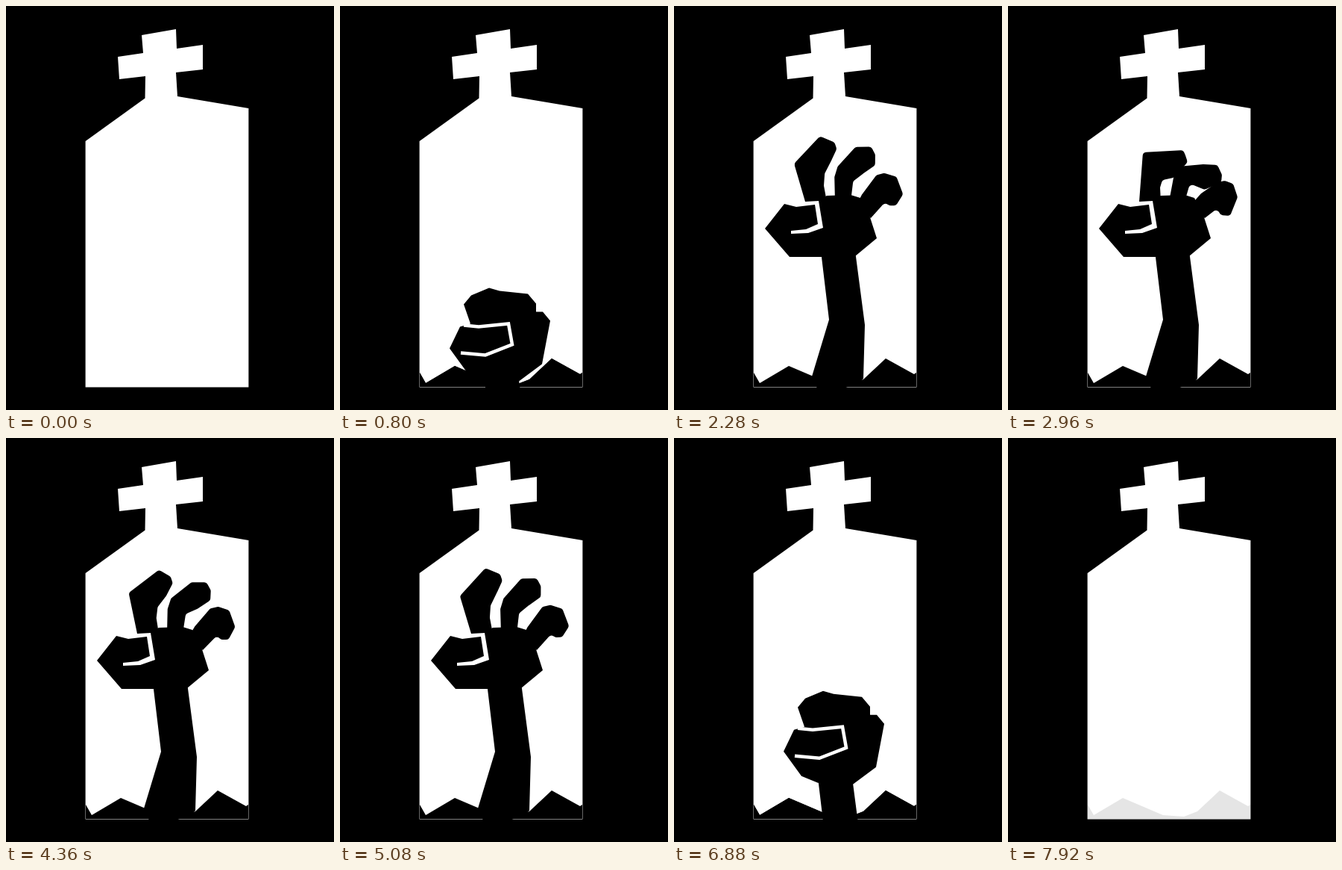
An HTML page with a canvas that plays this animation: 440x541 px, repeating every 8000 ms.

```html
<!DOCTYPE html>
<html lang="en">
<head>
<meta charset="utf-8">
<title>Hand at the gravestone</title>
<style>
html, body { margin: 0; width: 100%; height: 100%; overflow: hidden; background: #000; }
canvas { display: block; width: 440px; height: 541px; }
</style>
</head>
<body>
<canvas id="stage" width="440" height="541"></canvas>
<script>
const ctx = document.getElementById('stage').getContext('2d');
const LOOP = 8000, STEP = 40, DEPTH = 317;

const stone = [106.6, 181, 186.5, 123.5, 187, 94, 152, 98, 150, 68, 184, 63, 182, 39, 228, 31, 229, 57,
  264, 52, 264, 85, 228, 89, 230, 121, 325.4, 137, 325.4, 510.4, 106.6, 510.4];
const ground = [107, 491, 115, 505, 154, 482, 208, 505, 236, 507, 254, 500, 284, 472, 322, 493,
  325, 491, 325, 510, 107, 510];
const palm = [194, 261, 205, 254, 237, 253, 250, 257, 263, 283, 272, 311, 243, 335, 197, 336, 155, 336,
  122, 298, 148, 265, 164, 269, 189, 266, 193, 292, 177, 299, 157, 301, 157, 305, 180, 304, 200, 297];
const arm = [197, 328, 243, 328, 256, 427, 254, 499, 250, 503, 228, 512, 192, 512, 185, 496, 208, 420];
const fist = [175, 260, 166, 234, 176, 222, 200, 212, 214, 216, 252, 220, 263, 233, 263, 244, 272, 244,
  282, 256, 271, 314, 240, 337, 193, 335, 171, 326, 147, 293, 161, 264];
const fistCrease = [166, 262, 186, 264, 226, 260, 231, 288, 195, 302, 162, 299];

// A finger swings around its knuckle from the open to the bent outline.
const fingers = [
  { knuckle: [188, 258], left: [176, 262], right: [205, 262, 194, 261],
    open: [157, 217, 182, 173, 207, 179, 210, 188, 205, 200, 200, 222, 200, 240],
    bent: [181, 196, 235, 193, 238, 200, 241, 209, 222, 230, 207, 233, 204, 243] },
  { knuckle: [227, 258], left: [216, 262], right: [237, 262],
    open: [213, 229, 217, 215, 235, 183, 257, 182, 262, 192, 263, 208, 248, 219, 239, 234],
    bent: [222, 230, 228, 215, 262, 212, 281, 213, 287, 226, 286, 236, 264, 246, 244, 238] },
  { knuckle: [256, 270], left: [244, 268], right: [264, 284],
    open: [250, 254, 268, 224, 279, 221, 297, 226, 307, 251, 297, 263, 288, 263, 284, 259],
    bent: [259, 251, 281, 236, 291, 234, 302, 238, 308, 256, 298, 281, 285, 280, 281, 271] }
];

// Time and curl: 0 is an open hand, 1 a bent one.
const curls = [[960, 1], [1240, 0], [1600, 0.9], [1680, 1], [2120, 0], [2800, 1], [2960, 1],
  [4360, 0.4], [5960, 0], [6400, 0.15], [6800, 0]];

const lerp = (a, b, k) => a + (b - a) * k;
const clamp = k => Math.max(0, Math.min(1, k));

function curlAt(t) {
  const i = curls.findIndex(key => key[0] > t);
  if (i < 1) return 0;
  const [t0, a] = curls[i - 1], [t1, b] = curls[i];
  return lerp(a, b, (t - t0) / (t1 - t0));
}

function sinkAt(t) {
  return DEPTH * clamp(t < 3000 ? (920 - t) / 230 : (t - 6720) / 400);
}

function groundAlpha(t) {
  const tenths = t < 4000 ? Math.floor((t - 40) / 80) : 10 - Math.floor((t - 7200) / 80);
  return clamp(tenths / 10);
}

function trace(p) {
  ctx.beginPath();
  for (let i = 0; i < p.length; i += 2) ctx.lineTo(p[i], p[i + 1]);
}

function poly(p, color) {
  trace(p);
  ctx.fillStyle = color;
  ctx.fill();
}

function swing({ knuckle: [cx, cy], open, bent }, k) {
  const out = [];
  for (let i = 0; i < open.length; i += 2) {
    const ax = open[i] - cx, ay = open[i + 1] - cy;
    const bx = bent[i] - cx, by = bent[i + 1] - cy;
    const angle = lerp(Math.atan2(ay, ax), Math.atan2(by, bx), k);
    const r = lerp(Math.hypot(ax, ay), Math.hypot(bx, by), k);
    out.push(cx + r * Math.cos(angle), cy + r * Math.sin(angle));
  }
  return out;
}

function drawFinger(finger, curl) {
  const p = [...swing(finger, curl), ...finger.right];
  ctx.beginPath();
  ctx.moveTo(...finger.left);
  for (let i = 0; i < p.length - 2; i += 2) ctx.arcTo(p[i], p[i + 1], p[i + 2], p[i + 3], 5);
  ctx.lineTo(...p.slice(-2));
  ctx.fillStyle = '#000';
  ctx.fill();
}

function drawFist() {
  poly(fist, '#000');
  trace(fistCrease);
  ctx.strokeStyle = '#fff';
  ctx.lineWidth = 4.5;
  ctx.stroke();
  ctx.translate(-4, 0);
  poly(arm, '#000');
}

function drawHand(t) {
  if (t < 960 || t >= 6840) return drawFist();
  poly(palm, '#000');
  poly(arm, '#000');
  for (const finger of fingers) drawFinger(finger, curlAt(t));
}

function draw(t) {
  ctx.fillStyle = '#000';
  ctx.fillRect(0, 0, 440, 541);
  poly(stone, '#fff');

  ctx.globalAlpha = groundAlpha(t);
  poly(ground, '#000');
  ctx.globalAlpha = 1;

  const sink = sinkAt(t);
  if (sink >= DEPTH) return;
  ctx.save();
  ctx.beginPath();
  ctx.rect(0, 0, 440, 511);
  ctx.clip();
  ctx.translate(0, sink);
  drawHand(t);
  ctx.restore();
  // Keep the crease hidden once it is below the soil line.
  if (sink > 0) poly(ground, '#000');
}

const start = performance.now();
function frame() {
  const t = (performance.now() - start) % LOOP;
  ctx.globalAlpha = 1;
  draw(Math.floor(t / STEP) * STEP);
  requestAnimationFrame(frame);
}
frame();
</script>
</body>
</html>
```
